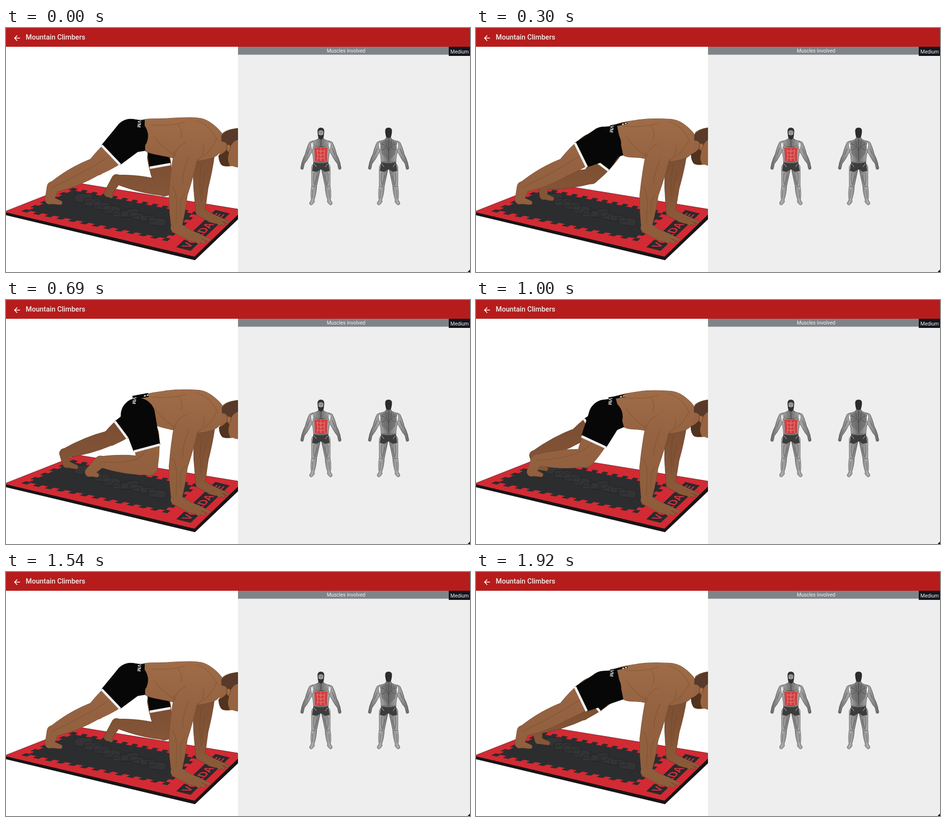
Write an HTML page that moves like this. It is 960 px wide and 507 px high and loops after 2010 ms.

```html
<!DOCTYPE html>
<html lang="en">
<head>
<meta charset="utf-8">
<title>Mountain Climbers</title>
<style>
  html, body { margin: 0; width: 100%; height: 100%; overflow: hidden; background: #fff; }
  svg { display: block; width: 960px; height: 507px; }
  text { font-family: Roboto, sans-serif; }
  .print { font-family: "Liberation Sans", Arial, sans-serif; font-weight: 700; text-anchor: middle; }
  .small { font-size: 10.4px; text-anchor: middle; fill: #f4f4f4; }
  .skin, .far, .gray { paint-order: stroke; stroke-linejoin: round; }
  .skin { fill: url(#skin); stroke: #6d472f; stroke-width: 1.2; }
  .far { fill: url(#farSkin); stroke: #593823; stroke-width: 1.2; }
  .gray { fill: url(#gray); stroke: #484848; stroke-width: 1.4; }
  .crease { fill: none; stroke: #60391f; stroke-opacity: .25; stroke-width: 1.6; stroke-linecap: round; }
  .cloth { fill: #070707; stroke: #070707; }
  .hem { fill: none; stroke: #f3f1f0; stroke-width: 5; }
  .line { fill: none; stroke: #3c3c3c; stroke-width: .9; stroke-opacity: .75; }
</style>
</head>
<body>
<svg viewBox="0 0 960 507" xmlns="http://www.w3.org/2000/svg">
  <defs>
    <linearGradient id="skin" gradientUnits="userSpaceOnUse" x1="0" y1="185" x2="0" y2="450">
      <stop offset="0" stop-color="#a06c48"/><stop offset=".35" stop-color="#956341"/><stop offset="1" stop-color="#8d5c3b"/>
    </linearGradient>
    <linearGradient id="farSkin" gradientUnits="userSpaceOnUse" x1="0" y1="250" x2="0" y2="405">
      <stop offset="0" stop-color="#7a4d32"/><stop offset="1" stop-color="#8b5a3a"/>
    </linearGradient>
    <linearGradient id="gray">
      <stop offset="0" stop-color="#6d6d6d"/><stop offset=".45" stop-color="#acacac"/><stop offset="1" stop-color="#686868"/>
    </linearGradient>
    <pattern id="weave" width="4" height="4" patternUnits="userSpaceOnUse" patternTransform="rotate(-20)">
      <path d="M0 0H4V4H0Z" fill="#dc2f38"/><path d="M0 1H4M1 0V4" stroke="#c3232d" stroke-width=".9"/>
    </pattern>
    <g id="half">
      <path id="halfBody" class="gray"/>
      <path class="line" d="M18 237Q14 242 17 249M23 250L29 263M14 300Q17 315 13 326M8 306L12 326M17 336L18 354M11 329H18"/>
    </g>
    <g id="body">
      <use href="#half"/><use href="#half" transform="scale(-1 1)"/>
      <path d="M-15 277Q0 281 15 277L18 297L9 299L1 294H-1L-9 299L-18 297Z" fill="#3c3c3c"/>
      <path d="M-15 278Q0 282 15 278M-14 282L-9 289M14 282L9 289" fill="none" stroke="#999" stroke-width="1.5" stroke-dasharray="3 1"/>
    </g>
  </defs>

  <rect width="960" height="507" fill="#fff"/>
  <path d="M-4 382L0 389L391 482.500L490 388V377Z" fill="#171517"/>
  <path d="M-4 382L148 322L490 378L390 475Z" fill="url(#weave)"/>
  <path d="M-4 382L148 322L490 378" fill="none" stroke="#5a1c20" stroke-width=".8"/>
  <path id="field" fill="#2c2d2f"/>
  <path id="relief" fill="#38383a" stroke="#232426" stroke-width="1.500" opacity=".6"/>
  <g transform="matrix(.71 -.68 1.100 .28 375 451)">
    <path d="M-12-13H11V14H-12ZM19-13H71V14H19ZM80-13H102V14H80Z" fill="#292a2c"/>
    <text class="print" y="8" x="0 15 30 45 60 75 90" font-size="21" fill="#d5323a">VORDANE</text>
  </g>

  <g class="lean">
    <path id="farArm" class="far"/>
    <path class="crease" d="M404 282Q398 320 404 362M412 300Q402 335 408 350"/>
  </g>
  <path id="farLeg" class="far"/>
  <path id="farCloth" class="cloth"/>
  <path id="farHem" class="hem"/>

  <path id="torso" class="skin"/>
  <g class="lean">
    <path class="crease" d="M300 201Q340 205 370 195M355 200Q372 220 352 244M392 192Q422 200 438 235M306 224Q320 246 345 262M408 266Q425 255 434 232"/>
    <g id="head">
      <path d="M446 220Q455 210 482 208V290Q474 290 468 287Q452 290 445 284Q437 270 441 262Q448 245 446 220Z" fill="#976340"/>
      <path d="M445 224Q455 210 482 208.500V232Q470 234 464 246L457 243Q454 236 445 236Z" fill="#573a29"/>
      <path d="M457 252Q447 263 439 265Q440 281 447 286Q455 289 463 286Q456 274 461 260Z" fill="#51331f"/>
      <path d="M456 244Q464 239 464 249Q461 259 457 256Z" fill="#a16b47" stroke="#60391f" stroke-width=".8"/>
    </g>
  </g>

  <path id="nearLeg" class="skin"/>
  <path id="legCrease" class="crease"/>
  <path id="band" class="cloth"/>
  <path id="bandMark" fill="none" stroke="#ddd" stroke-width="2.500" stroke-dasharray="4 2"/>
  <path id="cloth" class="cloth"/>
  <path id="hem" class="hem"/>
  <text id="tag" class="print" font-size="10" fill="#e8e8e8">VM</text>

  <g class="lean">
    <path id="nearArm" class="skin"/>
    <circle cx="375" cy="253" r="28" fill="url(#skin)"/>
    <path class="crease" d="M348 268Q352 244 372 238M396 275Q412 262 408 243M378 270Q365 295 365 326M344 330Q354 344 353 372T352 408M369 345Q358 358 361 388"/>
  </g>

  <rect x="480" y="39" width="480" height="468" fill="#eee"/>
  <rect x="480" y="39" width="480" height="16.500" fill="#7f8489"/>
  <text class="small" x="703.500" y="51.300">Muscles involved</text>
  <rect x="916" y="39" width="44" height="19" fill="#14161e"/>
  <text class="small" x="938.500" y="52.500">Medium</text>
  <path d="M960 502V507H955Z" fill="#111"/>

  <g transform="translate(651.500)">
    <use href="#body"/>
    <path d="M-7 215Q-7 207 0 207Q7 207 7 215L6 225Q4 232 0 232Q-4 232-6 225Z" fill="#303030"/>
    <path d="M-5 214Q0 211 5 214V221Q0 225-5 221Z" fill="#a0a0a0"/>
    <path class="line" d="M-4 216H-1M1 216H4M0 217V220M0 235V247M-16 240Q-10 249 0 246Q10 249 16 240"/>
    <path d="M-14 248Q-7 251 0 247Q7 251 14 248Q12 264 13 276Q0 280-13 276Q-12 264-14 248Z" fill="#d23f40"/>
    <path d="M0 248V277M-8 255Q0 258 8 255M-7 263Q0 266 7 263M-7 270Q0 273 7 270M-8 252Q-5 264-8 276M8 252Q5 264 8 276" fill="none" stroke="#ec9a96" stroke-width=".8"/>
  </g>
  <g transform="translate(791.500)">
    <use href="#body"/>
    <path d="M-18 238Q0 229 18 238L14 262L0 275L-14 262Z" fill="#666" opacity=".6"/>
    <path d="M-7 216Q-8 207 0 207Q8 207 7 216Q6 225 4 228H-4Q-6 225-7 216Z" fill="#2c2c2c"/>
    <path class="line" d="M0 230V275M-6 232Q-5 247 0 255Q5 247 6 232M-17 241Q-8 240-5 249L-15 254M17 241Q8 240 5 249L15 254"/>
  </g>

  <rect width="960" height="39" fill="#b71c1c"/>
  <path d="M29 21H18M23.300 15.500L17.800 21L23.300 26.500" fill="none" stroke="#fff" stroke-width="1.700"/>
  <text x="40.800" y="23.500" font-size="14.500" font-weight="500" fill="#f8eeee">Mountain Climbers</text>
</svg>

<script>
const $ = id => document.getElementById(id);
const set = (id, d) => $(id).setAttribute('d', d);
const add = (p, x, y) => [p[0] + x, p[1] + y];
const mix = (a, b, f) => a.map((v, k) => v + (b[k] - v) * f);
const poly = pts => 'M' + pts.join('L');

// the two points at distance r on either side of b, square to the line a-b
function across(a, b, r, at = b) {
  const dx = b[0] - a[0], dy = b[1] - a[1], k = r / Math.hypot(dx, dy);
  return [add(at, -dy * k, dx * k), add(at, dy * k, -dx * k)];
}

// tapered limb with round ends; flat cuts the far end square
function limb(a, b, ra, rb, bulge = 0, flat = false) {
  const [a1, a2] = across(a, b, ra, a), [b1, b2] = across(a, b, rb);
  const [m1, m2] = across(a, b, (ra + rb) / 2 + 2 * bulge, mix(a, b, .5));
  const end = flat ? 'L' : `A${rb} ${rb} 0 0 0 `;
  return `M${a1}Q${m1} ${b1}${end}${b2}Q${m2} ${a2}A${ra} ${ra} 0 0 0 ${a1}Z`;
}

// closed curve through all points
function smooth(pts) {
  const n = pts.length, at = i => pts[(i + n) % n];
  return 'M' + pts[0] + pts.map((b, i) => {
    const a = at(i - 1), c = at(i + 1), e = at(i + 2);
    return `C${b.map((v, k) => v + (c[k] - a[k]) / 6)} ${c.map((v, k) => v - (e[k] - b[k]) / 6)} ${c}`;
  }).join('') + 'Z';
}

const bone = 100;
function kneeOf(hip, ankle) {
  const d = Math.hypot(ankle[0] - hip[0], ankle[1] - hip[1]);
  const h = Math.sqrt(Math.max(0, bone ** 2 - d * d / 4)) + .01;
  return across(hip, ankle, h, mix(hip, ankle, .5))[1];
}

function legPath(hip, knee, ankle, ball, size, toe) {
  return limb(mix(hip, knee, .35), knee, 27 * size, 19 * size, 2) +
    limb(knee, ankle, 18 * size, 11 * size, 4 * size) +
    limb(ankle, ball, 12 * size, 9 * size) +
    limb(ball, add(ball, toe, 6), 8 * size, 4);
}

function hand(x, y, size) {
  const p = (dx, dy) => [x + dx * size, y + dy * size];
  let d = limb(p(0, 0), p(31, 17), 11 * size, 10 * size);
  for (let i = 0; i < 4; i++)
    d += limb(p(32, 10 + 4 * i), p(67 - 10 * i, 25 + 6 * Math.sin(i)), 4 * size, 3 * size);
  return d;
}

function drawStill() {
  set('nearArm', limb([372, 262], [356, 345], 25, 19, 1) + limb([356, 345], [353, 405], 19, 12, 1) + hand(352, 415, 1));
  set('farArm', limb([410, 262], [403, 330], 21, 15, 1) + limb([403, 330], [402, 376], 15, 10) + hand(402, 382, .85));
  set('halfBody', 'M0 227H4Q6 234 18 235Q23 240 20 250Q15 264 15 279H0Z' +
    limb([19, 242], [28, 264], 6, 4.5, .6) + limb([28, 264], [37, 281], 4.5, 2.5, .6) +
    limb([37, 282], [39, 291], 2.5, 2.5) + limb([10, 290], [14, 328], 9, 5) +
    limb([14, 329], [17, 357], 5, 2.7, 1) + limb([17, 360], [20, 364], 3.5, 3));

  // interlocking edge of the dark field
  const corners = [[31, 381], [138, 332], [399, 383], [334, 443]];
  const edge = corners.flatMap((a, side) => {
    const b = corners[(side + 1) % 4], inward = corners[(side + 2) % 4];
    const n = side % 2 ? 25 : 11, depth = side % 2 ? .07 : .03;
    const shift = mix(b, inward, depth).map((v, k) => v - b[k]);
    return Array.from({ length: 2 * n }, (_, i) => {
      const p = mix(a, b, Math.ceil(i / 2) / n);
      return (i >> 1) % 2 ? add(p, ...shift) : p;
    });
  });
  set('field', poly(edge) + 'Z');

  let seed = 7;
  const random = () => (seed = seed * 16807 % 2147483647) / 2147483647;
  let blobs = '';
  for (let i = 0; i < 9; i++) {
    const c = [150 + 19 * i, 366 + 3 * i + 26 * (random() - .5)], r = 6 + 3 * random();
    blobs += limb(c, add(c, 22, 10 * random() - 4), r, r);
  }
  set('relief', blobs);
}

// mirrors the transform of the leaning groups
const leaned = ([x, y], s) => [x + .03 * s * (415 - y), y * (1 - .013 * s) + 5.4 * s];
const trunk = [[330, 188], [382, 186], [415, 192], [446, 219], [448, 246], [430, 268], [385, 276], [338, 268]];

function draw(step) {
  const phase = step % 20;
  const near = Math.exp(-(((phase - 10.5) / 2.3) ** 4));
  const far = Math.exp(-(((phase - (phase > 10 ? 20.5 : .5)) / 2.6) ** 2));
  const lean = Math.max(0, 1 - far ** 2 - near ** 1.5);

  const hip = [266 + 24 * near, 226 + 21 * near ** .3];
  const ankle = [97 + 118 * near, 331 + 6 * near];
  const knee = kneeOf(hip, ankle);
  const ball = add(ankle, -7 - 19 * near, 26 - 5 * near);
  set('nearLeg', legPath(hip, knee, ankle, ball, 1, 22 - 8 * near));
  set('legCrease', `M${mix(hip, knee, .5)}Q${knee} ${ankle}`);

  const hip2 = [296 + 14 * far, 227 + 8 * far];
  const ankle2 = [121 + 112 * far, 328 - 14 * far - 10 * Math.sqrt(near)];
  const knee2 = kneeOf(hip2, ankle2);
  const ball2 = add(ankle2, 4 - 23 * far, 22 + 7 * far);
  set('farLeg', legPath(hip2, knee2, ankle2, ball2, .85, 20 - 14 * far));

  const cuff2 = mix(hip2, knee2, .72 - .2 * far);
  set('farCloth', limb(mix(hip2, knee2, .15), cuff2, 20, 22, 0, true));
  set('farHem', poly(across(hip2, cuff2, 22)));

  const pelvis = [258 + 7 * lean + 16 * near, 223 + 18 * lean + 14 * near];
  const waist = [286 + 12 * lean + 2 * near, 223 + 11 * lean + 5 * near];
  const cuff = mix(hip, knee, .62);
  const [low, top] = across(pelvis, waist, 31);
  set('torso', smooth([add(top, -6, 0), ...trunk.map(p => leaned(p, lean)), low, add(waist, -12, 0)]));
  set('cloth', limb(pelvis, waist, 35, 31, 0, true) + limb(pelvis, cuff, 35, 28, 0, true));
  set('hem', poly(across(pelvis, cuff, 28)));

  const twist = Math.max(lean, near), tip = add(top, 22 * twist, -6 * twist);
  set('band', poly([add(top, -14, 1), tip]));
  $('band').setAttribute('stroke-width', 4 + 5 * near);
  set('bandMark', poly([mix(top, tip, .5), tip]));
  $('tag').setAttribute('transform', `translate(${add(top, -14, 6)}) rotate(98)`);

  for (const g of document.querySelectorAll('.lean'))
    g.setAttribute('transform', `matrix(1 0 ${-.03 * lean} ${1 - .013 * lean} ${12.45 * lean} ${5.4 * lean})`);
  $('head').setAttribute('transform', `translate(${lean} ${-5 * lean})`);
}

const loop = 2010, steps = 26, lead = 15;
let shown = -1;
function tick() {
  const t = performance.now() % loop;
  const step = Math.min(steps - 1, Math.floor((t + lead) * steps / loop));
  if (step !== shown) draw(shown = step);
  requestAnimationFrame(tick);
}
drawStill();
tick();
</script>
</body>
</html>
```
